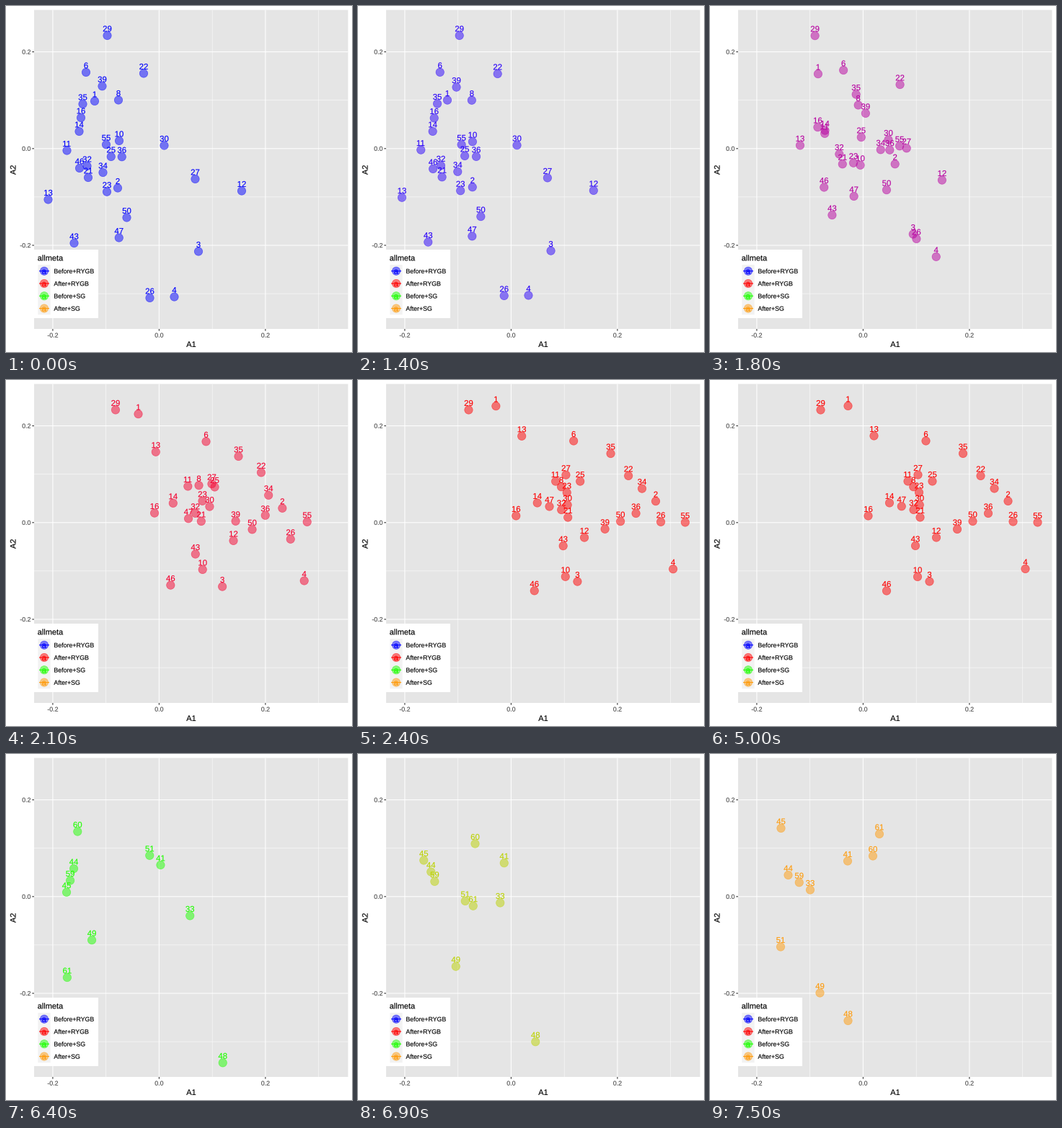
A matplotlib script that plays this animation: 480x480 px, repeating every 10000 ms.

```python
import numpy as np
import matplotlib.pyplot as plt
from matplotlib.animation import FuncAnimation
from matplotlib.collections import PathCollection
from matplotlib.patches import Circle, PathPatch, Rectangle
from matplotlib.path import Path
from matplotlib.textpath import TextPath
from matplotlib.transforms import Affine2D, IdentityTransform

plt.rcParams["font.family"] = "Liberation Sans"

SIZE, DPI = 480, 72
FRAMES, INTERVAL = 100, 100
SWAP = 51              # frame at which the second cohort replaces the first
LEFT, RIGHT, TOP, BOTTOM = 39, 474.5, 5.5, 448
DIGIT = 0.556          # digit advance in em
LABEL_SIZE = 11.38
RADIUS, RIM = 5.69, 0.71
COLORS = {
    "Before+RYGB": (0, 0, 255),
    "After+RYGB": (255, 0, 0),
    "Before+SG": (28, 255, 0),
    "After+SG": (255, 156, 13),
}


def trail(labels, *keys):
    """Spread labels evenly along the line through a few key points."""
    labels = labels.split()
    t = np.linspace(0, len(keys) - 1, len(labels))
    x, y = (np.interp(t, range(len(keys)), axis) for axis in zip(*keys))
    return dict(zip(labels, zip(x, y)))


RYGB_BEFORE = (
    trail("6 39 8", (111, 92), (156, 130.5))
    | trail("35 16 14", (106.5, 136), (101.5, 174))
    | trail("30 36 46", (219.5, 193.5), (102, 225))
    | trail("34 25 10", (134.5, 231), (157, 187))
    | trail("32 23 50", (112.5, 222), (167.5, 293.5))
    | trail("1 55 2", (123, 132), (155, 252.5))
    | trail("21 47 26", (114, 238), (199.5, 405))
    | trail("29 22 27 12 3 4 43 13 11",
            (140.5, 41), (191, 93.5), (262.5, 240), (327, 256.5),
            (267, 340.5), (233.5, 403.5), (94.5, 329), (58.5, 268.5),
            (84.5, 200.5))
)
RYGB_AFTER = (
    trail("36 50 39 12 43", (386, 185), (343, 207), (285, 230))
    | trail("11 8 23 30 21", (274.5, 140.5), (290, 156), (291.5, 190.5))
    | trail("14 47 32", (249, 170.5), (282.5, 180))
    | trail("22 34 2", (375.5, 133), (413.5, 168))
    | trail("29 1 13 6 35 27 25 16 46 10 3 4 26 55",
            (153.5, 41.5), (191.5, 36), (227.5, 77.5), (299.5, 84.5),
            (351, 102), (288.5, 131.5), (308.5, 140.5), (219.5, 188.5),
            (245, 292.5), (288, 273), (304.5, 279.5), (437.5, 262),
            (420.5, 196.5), (454.5, 197.5))
)
SG_BEFORE = (
    trail("44 59 45", (94, 159), (84, 192))
    | trail("60 51 41 33 49 61 48",
            (99, 107.5), (199.5, 140.5), (214.5, 154), (255.5, 224.5),
            (119, 258), (84.5, 310.5), (301, 428.5))
)
SG_AFTER = (
    trail("44 59 33", (108.5, 168), (139, 188.5))
    | trail("45 61 60 41 51 49 48",
            (98.5, 103), (235, 111), (226, 141.5), (191, 148.5),
            (98, 267.5), (152.5, 331.5), (191.5, 370))
)

fig = plt.figure(figsize=(SIZE / DPI, SIZE / DPI), dpi=DPI, facecolor="white")
ax = fig.add_axes([0, 0, 1, 1])
ax.set_xlim(0, SIZE)
ax.set_ylim(SIZE, 0)
ax.axis("off")


# Colour blending in CIE Lab
TO_XYZ = np.array([[0.4124, 0.3576, 0.1805],
                   [0.2126, 0.7152, 0.0722],
                   [0.0193, 0.1192, 0.9505]])
WHITE = TO_XYZ.sum(axis=1)


def to_lab(rgb):
    c = np.array(rgb) / 255
    c = np.where(c > 0.04045, ((c + 0.055) / 1.055) ** 2.4, c / 12.92)
    t = TO_XYZ @ c / WHITE
    f = np.where(t > 0.008856, np.cbrt(t), 7.787 * t + 16 / 116)
    return np.array([116 * f[1] - 16, 500 * (f[0] - f[1]), 200 * (f[1] - f[2])])


def from_lab(lab):
    fy = (lab[0] + 16) / 116
    f = np.array([fy + lab[1] / 500, fy, fy - lab[2] / 200])
    t = np.where(f > 0.2069, f ** 3, (f - 16 / 116) / 7.787)
    c = np.clip(np.linalg.solve(TO_XYZ, t * WHITE), 0, 1)
    c = np.where(c > 0.0031308, 1.055 * c ** (1 / 2.4) - 0.055, 12.92 * c)
    return tuple(np.clip(c, 0, 1))


def ease(p):
    p = min(max(p, 0), 1)
    return 4 * p ** 3 if p < 0.5 else 1 - 4 * (1 - p) ** 3


# Drawing helpers, all in pixels
def box(x0, y0, x1, y1, color, z):
    ax.add_patch(Rectangle((x0, y0), x1 - x0, y1 - y0, fc=color, lw=0,
                           zorder=z, snap=False))


def line(x0, y0, x1, y1, color, width, z):
    ax.plot([x0, x1], [y0, y1], color=color, lw=width, zorder=z,
            solid_capstyle="butt", snap=False)


def text(x, y, s, size, color="black", align=0.0, angle=0):
    path = TextPath((0, 0), s, size=size)
    ext = path.get_extents()
    shift = -(ext.x0 + ext.x1) / 2 if align == 0.5 else -align * ext.x1
    move = Affine2D().translate(shift, 0).rotate_deg(angle)
    move = move.scale(1, -1).translate(x, y)
    ax.add_patch(PathPatch(move.transform_path(path), fc=color, ec=color,
                           lw=0.15, zorder=8, snap=False))


def layer(paths, spots, z, width):
    marks = PathCollection(paths, offsets=spots, offset_transform=ax.transData,
                           transform=IdentityTransform(), linewidths=width,
                           zorder=z)
    marks.set_snap(False)
    ax.add_collection(marks, autolim=False)
    return marks


def number_path(s):
    return TextPath((-len(s) * DIGIT * LABEL_SIZE / 2, 5.6), s, size=LABEL_SIZE)


class Cohort:
    """Numbered dots that glide from one state to the other."""

    def __init__(self, before, after, names, start, length):
        ids = sorted(before, key=int)
        self.a = np.array([before[i] for i in ids])
        self.b = np.array([after[i] for i in ids])
        self.lab_a, self.lab_b = (to_lab(COLORS[n]) for n in names)
        self.start, self.length = start, length
        dot = Path.circle((0, 0), RADIUS)
        self.dots = layer([dot] * len(ids), self.a, 4, RIM)
        self.labels = layer([number_path(i) for i in ids], self.a, 5, 0.15)

    def update(self, k, visible):
        e = ease((k - self.start) / self.length)
        color = from_lab(self.lab_a + (self.lab_b - self.lab_a) * e)
        for marks, alpha in ((self.dots, 0.5), (self.labels, 1)):
            marks.set_offsets(self.a + (self.b - self.a) * e)
            marks.set_visible(visible)
            marks.set_facecolor((*color, alpha))
            marks.set_edgecolor((*color, alpha))


def px(v):
    return 212.4 + 737.5 * v


def py(v):
    return 197.8 - 671 * v


def draw_panel():
    box(LEFT, TOP, RIGHT, BOTTOM, "#e5e5e5", 1)
    for v in (-0.1, 0.1, 0.3):
        line(px(v), TOP, px(v), BOTTOM, "white", 0.53, 2)
        line(LEFT, py(-v), RIGHT, py(-v), "white", 0.53, 2)
    for v in (-0.2, 0.0, 0.2):
        x, y = px(v), py(v)
        line(x, TOP, x, BOTTOM, "white", 1.07, 3)
        line(LEFT, y, RIGHT, y, "white", 1.07, 3)
        line(x, BOTTOM, x, BOTTOM + 2.75, "#333333", 1.07, 3)
        line(LEFT - 2.75, y, LEFT, y, "#333333", 1.07, 3)
        text(x, 459.7, f"{v:.1f}", 8.8, "#4d4d4d", 0.5)
        text(34, y + 3.1, f"{v:.1f}", 8.8, "#4d4d4d", 1)
    text(256.7, 473, "A1", 11, align=0.5)
    text(13.5, 227.6, "A2", 11, align=0.5, angle=90)


def draw_legend():
    box(LEFT - 0.5, 338, 128, 433, "white", 6)
    text(43.7, 353.3, "allmeta", 11)
    x, half = 53, 8.64
    for i, (name, rgb) in enumerate(COLORS.items()):
        y = 367.7 + 2 * half * i
        color = tuple(v / 255 for v in rgb)
        box(x - half, y - half, x + half, y + half, "#f2f2f2", 6.1)
        ax.add_patch(Circle((x, y), RADIUS, fc=(*color, 0.5),
                            ec=(*color, 0.5), lw=RIM, zorder=7, snap=False))
        line(x - 7, y, x + 7, y, color, 1.07, 7.1)
        text(x, y + 4, "a", LABEL_SIZE, color, 0.5)
        text(66.4, y + 3.2, name, 8.8)


draw_panel()
draw_legend()
rygb = Cohort(RYGB_BEFORE, RYGB_AFTER, ("Before+RYGB", "After+RYGB"), 12, 13)
sg = Cohort(SG_BEFORE, SG_AFTER, ("Before+SG", "After+SG"), 63, 12)


def update(k):
    rygb.update(k, k < SWAP)
    sg.update(k, k >= SWAP)
    return rygb.dots, rygb.labels, sg.dots, sg.labels


anim = FuncAnimation(fig, update, frames=FRAMES, interval=INTERVAL,
                     init_func=lambda: update(0), repeat=True, blit=False)
plt.show()
```
